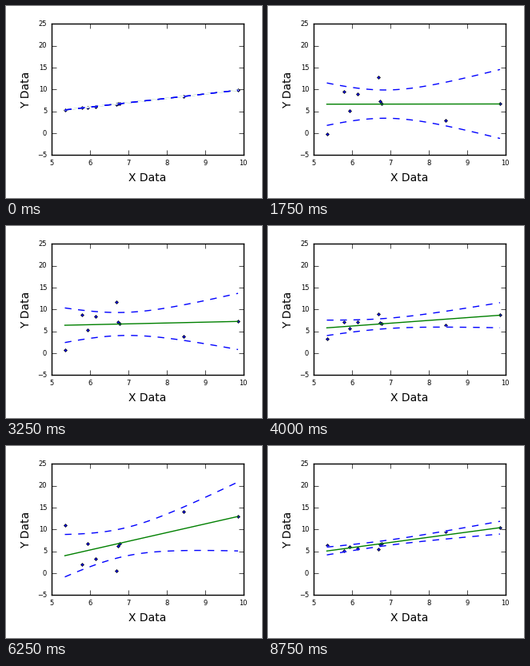
A matplotlib script that plays this animation: 320x240 px, repeating every 9 s.

```python
import numpy as np
import matplotlib.pyplot as plt
from matplotlib.animation import FuncAnimation

FRAMES, INTERVAL = 36, 250
T95 = 2.3646  # two-sided 95 % Student t, 7 degrees of freedom

plt.style.use("classic")
plt.rcParams.update({
    "font.family": "DejaVu Sans",
    "axes.labelsize": 10,
    "xtick.labelsize": 6,
    "ytick.labelsize": 6,
    "figure.facecolor": "white",
    "savefig.facecolor": "white",
})

x = np.array([5.35, 5.80, 5.935, 6.15, 6.695, 6.735, 6.78, 8.45, 9.86])
noise = np.array([-5.94, 4.0, -0.84, 3.1, 6.6, 0.58, 0.02, -5.94, -3.3])
grid = np.linspace(x.min(), x.max(), 100)


def fit_band(y):
    """Least-squares line on the grid and its confidence half-width."""
    dx = x - x.mean()
    sxx = (dx ** 2).sum()
    slope = (dx * y).sum() / sxx
    resid = y - y.mean() - slope * dx
    sigma = np.sqrt((resid ** 2).sum() / (len(x) - 2))
    dg = grid - x.mean()
    line = y.mean() + slope * dg
    return line, T95 * sigma * np.sqrt(1 / len(x) + dg ** 2 / sxx)


fig, ax = plt.subplots(figsize=(3.2, 2.4), dpi=100)
ax.set_xlim(5, 10)
ax.set_ylim(-5, 25)
ax.set_xticks(range(5, 11))
ax.set_yticks(range(-5, 26, 5))
ax.set_xlabel("X Data")
ax.set_ylabel("Y Data")

dots, = ax.plot(x, x, "bD", ms=2)
fit, = ax.plot(grid, grid, "g-", lw=1)
# white underlay keeps the dash gaps clear
under = [ax.plot(grid, grid, "w-", lw=1)[0] for _ in range(2)]
edges = [ax.plot(grid, grid, "b", ls=(0, (6, 6)), lw=1)[0] for _ in range(2)]
fig.tight_layout()


def update(i):
    y = x + noise * np.sin(2 * np.pi * i / FRAMES)
    line, half = fit_band(y)
    dots.set_ydata(y)
    fit.set_ydata(line)
    for pair in (under, edges):
        pair[0].set_ydata(line + half)
        pair[1].set_ydata(line - half)
    return [dots, fit, *under, *edges]


anim = FuncAnimation(fig, update, frames=FRAMES, interval=INTERVAL,
                     repeat=True, repeat_delay=0)
plt.show()
```
